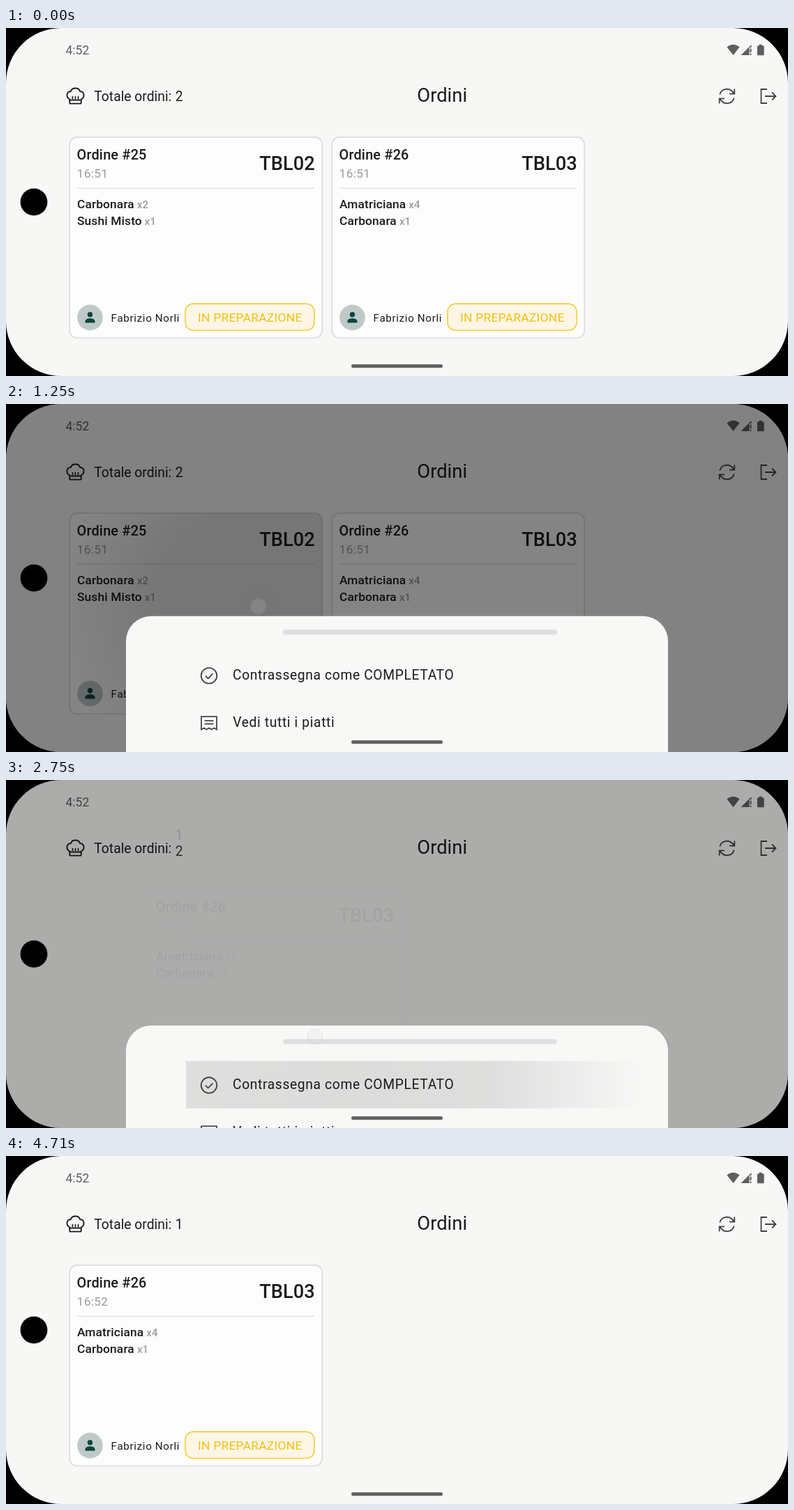
Write an HTML page that moves like this. It is 1121 px wide and 500 px high and loops after 4.75 s.

```html
<!DOCTYPE html>
<html lang="it">
<head>
<meta charset="utf-8">
<title>Ordini</title>
<style>
  html, body { margin: 0; width: 100%; height: 100%; overflow: hidden; background: #000; }
  svg { display: block; width: 100vw; height: 100vh; font-family: Roboto, Inter, sans-serif; }
  text { fill: #1a1c1a; white-space: pre; }
  .line { fill: none; stroke: #404543; stroke-width: 1.8; }
  .label { font-size: 19.3px; }
  .option { font-size: 19.3px; letter-spacing: .62px; }
  .order { font-size: 19.85px; font-weight: 500; letter-spacing: .19px; }
  .table { font-size: 27.3px; font-weight: 500; text-anchor: end; }
  .time { font-size: 17.36px; letter-spacing: .31px; fill: #999b9b; }
  .dish { font-size: 17.36px; font-weight: 500; letter-spacing: .12px; }
  .count { font-size: 14.9px; fill: #999b9d; }
  .waiter { font-size: 15.2px; letter-spacing: .65px; }
  .state { font-size: 17.36px; letter-spacing: .28px; text-anchor: middle; fill: #f2c011; }
</style>
</head>
<body>
<svg viewBox="0 0 1121 500" preserveAspectRatio="none">
  <defs>
    <clipPath id="screen"><rect width="1121" height="500" rx="79"/></clipPath>
    <clipPath id="cardClip"><rect x="91" y="156.5" width="362.5" height="289" rx="11"/></clipPath>
    <clipPath id="rowClip"><rect x="258" y="335" width="671" height="68"/></clipPath>
    <radialGradient id="ink">
      <stop offset="0" stop-opacity=".115"/>
      <stop offset=".5" stop-opacity=".105"/>
      <stop offset="1" stop-opacity="0"/>
    </radialGradient>
  </defs>
  <rect width="1121" height="500"/>
  <g clip-path="url(#screen)">
    <rect width="1121" height="500" fill="#f7f8f6"/>

    <g fill="#5e605e">
      <text x="85.5" y="37.8" font-size="17.5" style="fill:#5e605e">4:52</text>
      <path d="M1033.5 27.5 Q1042.5 20 1051.5 27.5 L1042.5 39Z"/>
      <path d="M1053.5 39 L1068.5 24 V28 H1065.5 V39Z"/>
      <path d="M1066.5 29.5h2v5.5h-2z M1066.5 36.8h2v2.2h-2z"/>
      <path d="M1079.5 25.5v-1.8h4.4v1.8h1.6q1.2 0 1.2 1.2v11.3q0 1.2-1.2 1.2h-7.4q-1.2 0-1.2-1.2v-11.3q0-1.2 1.2-1.2z"/>
    </g>

    <g class="line" style="stroke:#1a1c1a;stroke-width:1.9" stroke-linejoin="round">
      <path d="M91.2 102.5 C85.5 99.5 86.5 91.2 93 91 C94.5 85 104.5 85 106 91 C112.5 91.2 113.5 99.5 107.8 102.5 V107 q0 1.6-1.6 1.6 H92.8 q-1.6 0-1.6-1.6Z M91.2 103.5H107.8"/>
      <path d="M95.5 98v4 M99.5 98v4 M103.5 98v4" stroke-width="1.6"/>
    </g>
    <text class="label" x="126.3" y="104.5">Totale ordini: </text>
    <text class="label" id="two" x="242.8" y="104.5">2</text>
    <text class="label" id="one" x="242.8" y="104.5">1</text>
    <text x="589.3" y="106" font-size="27.4">Ordini</text>
    <g class="line">
      <path d="M1023.3 95.5 C1025.5 86.5 1038 84.5 1043.3 94 M1044.3 87.5V94.7H1037 M1043.7 100.5 C1041.5 109.5 1029 111.5 1023.7 102 M1022.7 108.5V101.3H1030"/>
      <path d="M1091 88H1082.5V108H1091 M1088 98H1103.5 M1098 92.5l5.5 5.5-5.5 5.5"/>
    </g>

    <g id="before"></g>
    <g id="after"></g>
    <g clip-path="url(#cardClip)"><circle id="cardInk" cx="362" cy="291" fill="url(#ink)"/></g>
    <rect id="barrier" width="1121" height="500"/>

    <g id="sheet">
      <rect x="172" y="284" width="777" height="300" rx="36" fill="#f8f9f7"/>
      <rect x="397" y="303.3" width="393" height="7.4" rx="3.7" fill="#dfdfdf"/>
      <g clip-path="url(#rowClip)"><circle id="rowInk" cy="369" fill="url(#ink)"/></g>
      <g class="line">
        <circle cx="291" cy="369.7" r="11.3"/>
        <path d="M286 370l3.7 3.7 6.8-7"/>
        <path d="M280 428.5H302V447l-3.7-2.2-3.6 2.2-3.7-2.2-3.7 2.2-3.6-2.2-3.7 2.2Z M284.5 434.5H297.5 M284.5 439H297.5"/>
      </g>
      <text class="option" x="325" y="375">Contrassegna come COMPLETATO</text>
      <text class="option" x="325.3" y="443">Vedi tutti i piatti</text>
    </g>

    <circle id="touch" r="10.8" fill="#dcdde2" fill-opacity=".85" stroke="#b3c0da" stroke-width="1.7"/>
    <circle cx="40" cy="250" r="19.4"/>
    <rect x="495" y="483.2" width="131" height="5" rx="2.5" fill="#606260"/>
  </g>
</svg>
<script>
const LOOP = 4750;
const OPEN = 1100, CLOSE = 2617, REFRESH = 2680, FLIP = 2698;
const $ = id => document.getElementById(id);
const clamp = v => Math.min(1, Math.max(0, v));
const span = (t, from, length) => clamp((t - from) / length);

function bezier(x1, y1, x2, y2) {
  const at = (a, b, s) => 3 * (1 - s) * (1 - s) * s * a + 3 * (1 - s) * s * s * b + s * s * s;
  return x => {
    let low = 0, high = 1;
    for (let i = 0; i < 24; i++) {
      const mid = (low + high) / 2;
      if (at(x1, x2, mid) < x) low = mid; else high = mid;
    }
    return at(y1, y2, (low + high) / 2);
  };
}
const ease = bezier(.25, .1, .25, 1);
const decelerate = bezier(0, 0, .2, 1);

function card(x, number, table, time, dishes) {
  const list = dishes.map(([name, count], i) =>
    `<text class="dish" x="102" y="${258.7 + 24 * i}">${name}<tspan class="count" dx="4">x${count}</tspan></text>`).join('');
  return `<g transform="translate(${x})">
    <rect x="91.2" y="156.8" width="362" height="288.6" rx="11" fill="#fdfdfd" stroke="#dddedd" stroke-width="1.9"/>
    <text class="order" x="101.6" y="189.4">Ordine #${number}</text>
    <text class="time" x="101.6" y="214.6">${time}</text>
    <text class="table" x="442.8" y="203.6">${table}</text>
    <path d="M102 230.2H442" stroke="#e1e2e5" stroke-width="1.4"/>
    ${list}
    <circle cx="120.5" cy="416" r="18.4" fill="#bfcac8"/>
    <g fill="#0a4540"><circle cx="120.5" cy="411.7" r="3.7"/>
      <path d="M113.5 423.5v-2.4c0-5.3 14-5.3 14 0v2.4z"/></g>
    <text class="waiter" x="150.6" y="421.6">Fabrizio Norli</text>
    <rect x="257" y="396.2" width="185" height="38.2" rx="11.5" fill="#fdf6e5" stroke="#f3c71c" stroke-width="1.4"/>
    <text class="state" x="349.8" y="421.6">IN PREPARAZIONE</text>
  </g>`;
}

const second = [['Amatriciana', 4], ['Carbonara', 1]];
$('before').innerHTML =
  card(0, 25, 'TBL02', '16:51', [['Carbonara', 2], ['Sushi Misto', 1]]) +
  card(376, 26, 'TBL03', '16:51', second);
$('after').innerHTML = card(0, 26, 'TBL03', '16:52', second);

function set(id, attributes) {
  for (const [key, value] of Object.entries(attributes)) $(id).setAttribute(key, value);
}
const shift = (x, y) => `translate(${x} ${y})`;

function tapOpacity(t, down, up) {
  return t < down ? 0 : 1 - span(t, up, 200);
}

function draw(t) {
  const sheet = t < CLOSE ? span(t, OPEN, 250) : 1 - span(t, CLOSE, 200);
  set('barrier', { opacity: .54 * ease(sheet) });
  set('sheet', {
    transform: shift(0, 216 * (1 - decelerate(sheet))),
    visibility: sheet > 0 ? 'visible' : 'hidden'
  });

  const enter = ease(span(t, REFRESH, 1000));
  set('before', { visibility: t < REFRESH ? 'visible' : 'hidden' });
  set('after', { opacity: enter, transform: shift(120 * (1 - enter), 0) });

  const flip = span(t, FLIP, 300);
  set('two', { opacity: 1 - flip, transform: shift(0, 23 * flip) });
  set('one', { opacity: flip, transform: shift(0, -23 * (1 - flip)) });

  const spread = span(t, 1090, 450);
  set('cardInk', { r: 60 + 640 * spread, opacity: spread > 0 ? 1 - span(t, 1280, 260) : 0 });
  const rowSpread = span(t, 2590, 300);
  set('rowInk', { cx: 443 + 70 * rowSpread, r: 60 + 700 * rowSpread, opacity: span(t, 2590, 60) });

  const first = t < 2000;
  set('touch', {
    cx: first ? 362 : 443,
    cy: first ? 291 : 368.5,
    opacity: first ? tapOpacity(t, 1010, 1085) : tapOpacity(t, 2530, 2600)
  });
}

const start = performance.now();
function tick() {
  draw((performance.now() - start) % LOOP);
  requestAnimationFrame(tick);
}
tick();
</script>
</body>
</html>
```
